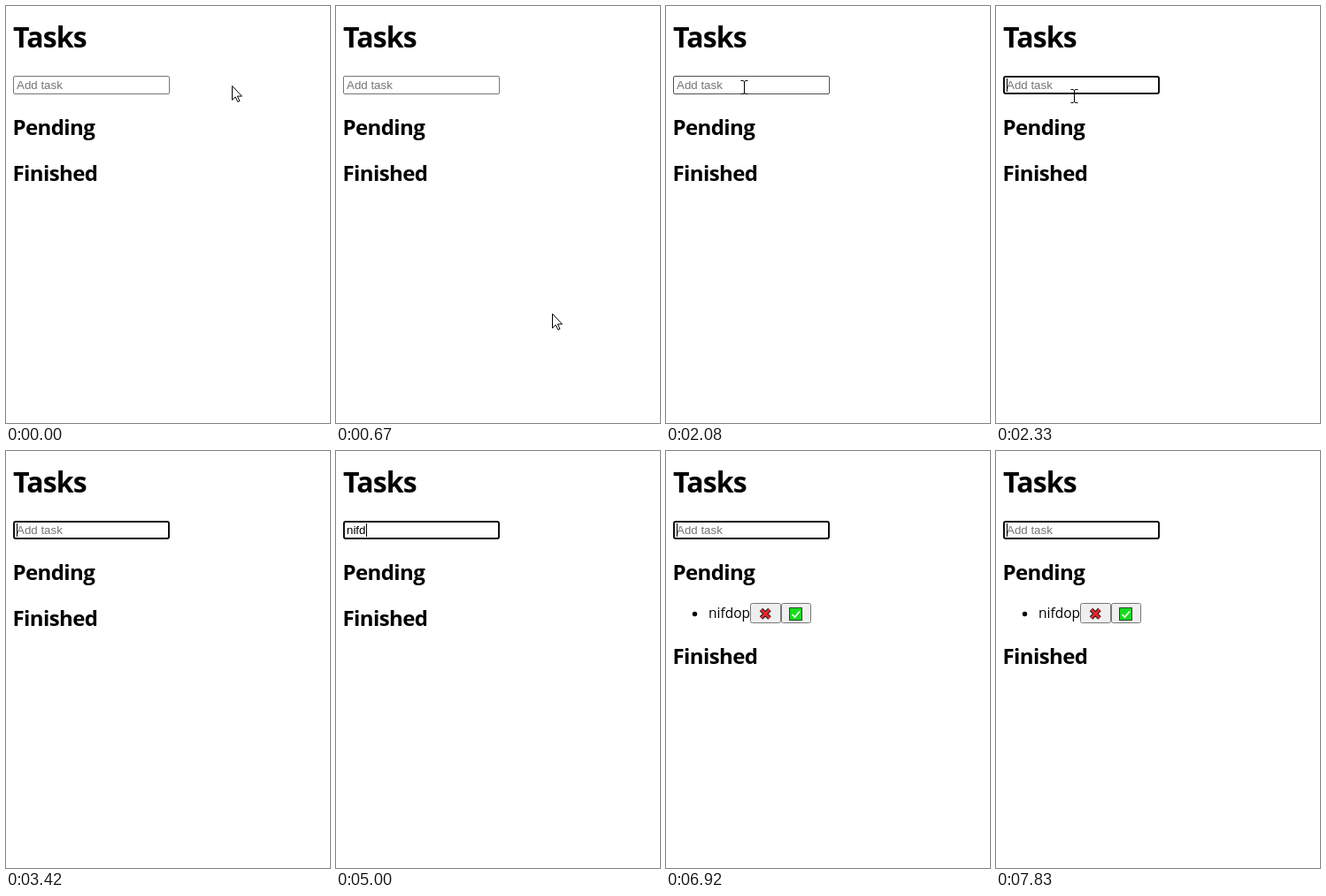
An HTML page for the animation above (8000 ms loop, 366x472 px).

```html
<!DOCTYPE html>
<html lang="en">
<head>
<meta charset="utf-8">
<title>Tasks</title>
<style>
  html, body { margin: 0; width: 100%; height: 100%; overflow: hidden; background: #fff; }
  svg { display: block; }
  .head { font: 700 24px "Open Sans", "Noto Sans", sans-serif; letter-spacing: -.025em; }
  .title { font-size: 32px; }
  .item { font: 15.5px "Open Sans", "Noto Sans", sans-serif; }
  .field { font: 13.333px "Liberation Sans", Arial, sans-serif; }
  .button { fill: #efefef; stroke: #767676; }
</style>
</head>
<body>
<svg width="366" height="472" viewBox="0 0 366 472">
  <text class="head title" x="8" y="47">Tasks</text>
  <rect id="box" fill="#fff"/>
  <text id="hint" class="field" x="12" y="94" fill="#757575">Add task</text>
  <text id="typed" class="field" x="12" y="94"></text>
  <rect id="caret" y="82" width="1" height="15"/>

  <text class="head" x="7.5" y="146">Pending</text>
  <g id="task">
    <circle cx="32.5" cy="184.5" r="2.7"/>
    <text class="item" x="48" y="189">nifdop</text>
    <rect class="button" x="95.5" y="172.5" width="34" height="22" rx="2"/>
    <rect class="button" x="130.5" y="172.5" width="33" height="22" rx="2"/>
    <g fill="none">
      <path d="M107.5 179.5l9.5 9.5m0-9.5l-9.5 9.5" stroke="#222" stroke-width="5"/>
      <path d="M107.5 179.5l9.5 9.5m0-9.5l-9.5 9.5" stroke="#e8262b" stroke-width="2.8"/>
      <rect x="139.5" y="177.5" width="14" height="14" fill="#16dc1d" stroke="#26452a"/>
      <path d="M142.5 185l3 3l5.5-6.5" stroke="#fff" stroke-width="1.7"/>
    </g>
  </g>
  <text id="finished" class="head" x="7.5">Finished</text>

  <path id="arrow" d="M.5 .5v16l3.7-3.6 2.6 5.6 2.2-1-2.6-5.4h5.1z" fill="#fff" stroke="#000"/>
  <path id="beam" d="M-3.5-7.5h2.5l1.5 1 1.5-1h2.5M.5-6.5v13M-3.5 7.5h2.5l1.5-1 1.5 1h2.5" fill="none" stroke="#000"/>
</svg>
<script>
const LOOP = 8000;
const WORD = "nifdop";
const el = id => document.getElementById(id);

// Each row: start time in ms, then the values held until the next row.
const POINTER = [
  [0, "arrow", 255, 90], [80, "arrow", 255, 108], [170, "arrow", 252, 180],
  [250, "arrow", 248, 260], [330, "arrow", 245, 325], [420, "arrow", 244, 348],
  [1000, "none", 0, 0],
  [1670, "arrow", 122, 148], [1750, "arrow", 101, 100], [1830, "beam", 94, 93],
  [1920, "beam", 91, 91], [2000, "beam", 89, 91], [2080, "beam", 88, 92],
  [2170, "beam", 88, 94], [2330, "beam", 88, 102],
  [2420, "arrow", 84, 130], [2500, "arrow", 78, 168], [2580, "none", 0, 0]
];
const LETTERS = [
  [0, 0], [4170, 1], [4250, 2], [4420, 3], [5000, 4], [5080, 5], [5670, 6], [6920, 0]
];
const CARET = [
  [0, 0], [2330, 1], [2830, 0], [3420, 1], [3920, 0], [4170, 1],
  [6170, 0], [6920, 1], [7250, 0], [7830, 1]
];
const BORDER = [
  [0, "#767676", 1], [1670, "#4f4f4f", 1], [2330, "#101010", 2]
];
const ADDED = 6920;

const at = (rows, t) => rows.findLast(row => row[0] <= t);
const show = (node, on) => node.setAttribute("visibility", on ? "visible" : "hidden");
const set = (node, attrs) => {
  for (const name in attrs) node.setAttribute(name, attrs[name]);
};

const typed = el("typed"), caret = el("caret");

function drawField(t) {
  const [, stroke, width] = at(BORDER, t);
  set(el("box"), {
    x: 8 + width / 2, y: 79 + width / 2, width: 177 - width, height: 21 - width,
    rx: 1 + width / 2, stroke, "stroke-width": width
  });
  const count = at(LETTERS, t)[1];
  typed.textContent = WORD.slice(0, count);
  show(el("hint"), !count);
  show(caret, at(CARET, t)[1]);
  caret.setAttribute("x", count ? Math.round(12 + typed.getComputedTextLength()) : 12);
}

function drawPointer(t) {
  const [, shape, x, y] = at(POINTER, t);
  for (const id of ["arrow", "beam"]) {
    show(el(id), id === shape);
    el(id).setAttribute("transform", `translate(${x} ${y})`);
  }
}

function draw(t) {
  drawField(t);
  drawPointer(t);
  show(el("task"), t >= ADDED);
  el("finished").setAttribute("y", t >= ADDED ? 241 : 198);
}

const start = performance.now();
function tick() {
  draw((performance.now() - start) % LOOP);
  requestAnimationFrame(tick);
}
tick();
</script>
</body>
</html>
```
